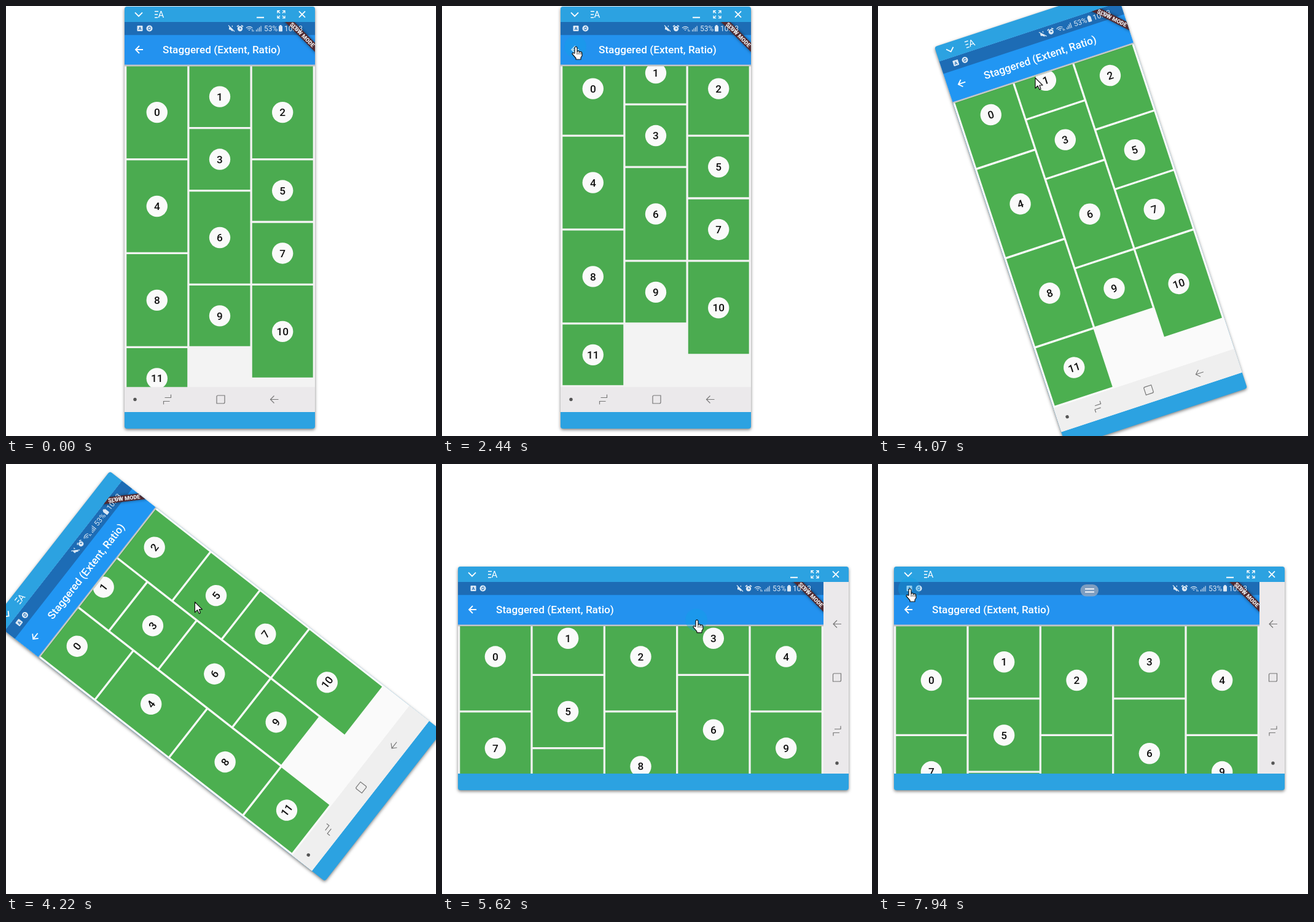
Recreate the animation shown at these times as an HTML page with a canvas. Size 700 by 700 pixels, loop 8 s.

```html
<!DOCTYPE html>
<html lang="en">
<head>
<meta charset="utf-8">
<title>Staggered grid</title>
<style>
html, body { margin: 0; width: 100%; height: 100%; overflow: hidden; background: #fff; }
canvas { display: block; width: 100vw; height: 100vh; }
</style>
</head>
<body>
<canvas id="stage" width="700" height="700"></canvas>
<script>
const c = document.getElementById('stage').getContext('2d');
const LOOP = 8000, GAP = 3.3, TOP = 69.5;
const TURN = 3990, TURNED = 4390; // the window rotates between these times
const HAND = new Path2D('M-2 2Q0-2 2 2V8Q5 6 6 9Q9 7 10 11V15L8 18V21H0V19L-6 12Q-6 9-3 11H-2Z');
const ARROW = new Path2D('M0 0V17L4 13L7 19L9 18L7 12H12Z');

// Each move: [begin, end, ...goal]; it rests in between.
const POINTER = [
  [0, 1, 580, 688], [254, 980, 366, 300], [1060, 1290, 360, 209], [1830, 2440, 217, 66],
  [2680, 3140, 420, 182], [3370, 4000, 256, 117], [4100, 4460, 409, 437],
  [5400, 5800, 418, 105], [5900, 6100, 416, 361], [6250, 6780, 449, 618],
  [6780, 7100, 435, 520], [7100, 7940, 51, 203]
];
const SCROLL = [[0, 1, 0], [1060, 1220, 38.5], [6270, 6480, 0]];

const clamp = v => Math.max(0, Math.min(1, v));
const ramp = (t, a, b) => clamp((t - a) / (b - a));
const pulse = (t, a, b) => clamp(3 * Math.sin(Math.PI * ramp(t, a, b)));

function follow(moves, t) {
  return moves.reduce((v, [a, b, ...goal]) =>
    goal.map((g, i) => v[i] + (g - v[i]) * ramp(t, a, b)), [0, 0]);
}

function box(x, y, w, h, color, r = 0) {
  c.fillStyle = color;
  c.beginPath();
  c.roundRect(x, y, w, h, r);
  c.fill();
}

function disc(x, y, r, color) {
  c.fillStyle = color;
  c.beginPath();
  c.arc(x, y, r, 0, 7);
  c.fill();
}

function line(d, color, width, x = 0, y = 0, turns = 0) {
  c.save();
  c.translate(x, y);
  c.rotate(turns * Math.PI / 2);
  c.strokeStyle = color;
  c.lineWidth = width;
  c.stroke(new Path2D(d));
  c.restore();
}

function text(s, x, y, font, color, align = 'left') {
  c.font = font + ' Roboto, sans-serif';
  c.fillStyle = color;
  c.textAlign = align;
  c.fillText(s, x, y);
}

function clipBox(x, y, w, h) {
  c.beginPath();
  c.rect(x, y, w, h);
  c.clip();
}

// Even tiles are three units tall, odd ones two; each goes to the shortest column.
function grid(width, cols, unit, scroll) {
  const w = (width - GAP * (cols + 1)) / cols;
  const ends = Array(cols).fill(0);
  for (let i = 0; i < 12; i++) {
    const col = ends.indexOf(Math.min(...ends)), span = i % 2 ? 2 : 3;
    const h = span * unit - GAP;
    const x = GAP + col * (w + GAP), y = TOP + 2.8 + ends[col] * unit - scroll;
    box(x, y, w, h, bright ? '#4caf50' : '#4bab50');
    disc(x + w / 2, y + h / 2, 17.2, '#fafafa');
    text(i, x + w / 2, y + h / 2 + 6.1, '500 17.2px', '#111', 'center');
    ends[col] += span;
  }
}

function banner(w) {
  c.save();
  clipBox(0, 0, w, 100);
  c.translate(w, 0);
  c.rotate(Math.PI / 4);
  c.shadowColor = 'rgba(0,0,0,.5)';
  c.shadowBlur = 5;
  box(-50, 24, 100, 10.4, '#512a31');
  c.shadowColor = 'transparent';
  text('SLOW MODE', 0, 32.5, '900 9.2px', '#eee', 'center');
  c.restore();
}

function statusIcons(w) {
  const ink = '#dce9f5', blue = '#1d6cb5';
  box(20.5, 6, 9, 9, ink, 1);
  text('A', 25, 13.3, 'bold 7px', blue, 'center');
  disc(40.5, 10.5, 5, ink);
  line('M-2 0Q0-4 2-1M2 0Q0 4-2 1', blue, 1.2, 40.5, 10.5);
  c.save();
  c.translate(w - 136, 10.5);
  c.fillStyle = ink;
  c.fill(new Path2D('M-4-2H-2L2-5V5L-2 2H-4Z'));
  line('M-5-5L5 5', blue, 2.5, 1, -1);
  line('M-5-5L5 5', ink, 1.2);
  disc(14, 0.5, 4.2, ink);
  line('M0-2V0H2', blue, 1.2, 14, 0.5);
  line('M-5-3L-2-5M5-3L2-5', ink, 1.6, 14, 0);
  for (let i = 0; i < 3; i++) {
    c.beginPath();
    c.arc(29, 4, 1.5 + 2.7 * i, -2.4, -0.75);
    c.strokeStyle = ink;
    c.lineWidth = 1.1;
    c.stroke();
  }
  line('M5 1V5M7 3V5', ink, 1, 29, 0);
  for (let i = 0; i < 4; i++) box(40 + 2.5 * i, 2 - 2 * i, 1.1, 3 + 2 * i, ink);
  text('53%', 53, 4.4, '12px', ink);
  box(77, -4, 6, 9, ink, 1);
  box(78.5, -5.5, 3, 2, ink);
  text('10:13', 86, 4.4, '12px', ink);
  c.restore();
}

function navIcon(kind, x, y) {
  const ink = '#777';
  if (kind == 0) disc(x, y, 2.7, '#555');
  if (kind == 1) [0, 2].forEach(q => line('M-4-3H6V-8', ink, 1.2, x, y, q));
  if (kind == 2) {
    c.strokeStyle = ink;
    c.lineWidth = 1.2;
    c.beginPath();
    c.roundRect(x - 6.5, y - 6.5, 13, 13, [2, 0, 2, 0]);
    c.stroke();
  }
  if (kind == 3) line('M7 0H-6M0-6L-6 0L0 6', ink, 1.2, x, y);
}

// The edge of a huge circle shows when scrolling past the end.
function glow(w, h, land, force) {
  const r = 1000, depth = 32 * force;
  disc(w / 2, land ? TOP + depth - r : h - depth + r, r, `rgba(33,150,243,${0.075 * force})`);
}

function app(land, scroll, force) {
  const w = land ? 595 : 310, h = land ? 312 : 594.3;
  c.save();
  clipBox(0, 0, land ? 636 : 310, land ? 312 : 635);
  box(0, 0, 636, 636, bright ? '#fafafa' : '#f3f3f3');

  c.save();
  clipBox(0, TOP + 2.5, w, h - TOP);
  grid(w, land ? 5 : 3, land ? 59.6 : 50.97, scroll);
  if (force) glow(w, h, land, force);
  c.restore();

  const shade = c.createLinearGradient(0, TOP, 0, TOP + 4);
  shade.addColorStop(0, 'rgba(0,0,0,.3)');
  shade.addColorStop(1, 'rgba(0,0,0,0)');
  box(0, TOP, w, 4, shade);
  box(0, 0, w, TOP, bright ? '#2196f3' : '#2392ef');
  box(0, 0, w, 21.2, '#1d6cb5');
  line('M6 0H-6M0-6L-6 0L0 6', '#fff', 1.8, 24, 45);
  text('Staggered (Extent, Ratio)', 62, 51, '500 17.2px', '#fff');
  banner(w);
  statusIcons(w);

  const bar = bright ? '#efefef' : '#ebe9eb';
  if (land) box(595, 0, 41, 312, bar);
  else box(0, h, 310, 41, bar);
  for (let i = 0; i < 4; i++) {
    const d = i ? 87 * i - 17.5 : 17;
    if (land) navIcon(i, 617, 312 - d);
    else navIcon(i, d, 614.5);
  }
  c.restore();
}

function frame(x, y, w, h, buttons) {
  c.save();
  c.shadowColor = 'rgba(0,0,0,.5)';
  c.shadowBlur = 5;
  c.shadowOffsetY = 2;
  box(x, y, w, h, '#2ca2e1', 4);
  c.restore();
  const m = y + 12.7, r = x + w;
  line('M-6-3L0 3L6-3', '#fff', 1.8, x + 23, m);
  line('M-7-5H-1M-7 0H-2M-7 5H-2', '#fff', 1.4, x + 56, m);
  text('A', x + 59.5, m + 5.5, '15px', '#fff', 'center');
  if (!buttons) return;
  line('M-6 5H6', '#fff', 2, r - 89, m);
  for (let q = 0; q < 4; q++) {
    line('M2 2L6 6M6 2V6H2', '#fff', 1.3, r - 55, m, q);
    line('M0 0L5 5', '#fff', 1.8, r - 21, m, q);
  }
}

function portrait(t, scroll, force) {
  const turn = ramp(t, TURN, TURNED);
  c.save();
  c.translate(347, 349);
  c.rotate(-turn * Math.PI / 2);
  c.translate(-347, -349);
  frame(193, 1, 310, 687, !turn);
  c.translate(193, 26);
  app(false, scroll, force);
  c.restore();
}

function landscape(t, scroll, force) {
  const mix = ramp(t, 4690, 4960);
  frame(26, 167, 636, 364, true);
  c.save();
  c.translate(26, 504);
  c.scale(636 / 635, 312 / 310);
  c.rotate(-Math.PI / 2);
  if (mix < 1) app(false, scroll, force);
  c.restore();
  c.save();
  c.globalAlpha = mix;
  c.translate(26, 192);
  if (mix) app(true, scroll, force);
  c.restore();
  if (t > 6950) {
    box(329.5, 196, 29.5, 19.5, 'rgba(150,170,195,.8)', 9.7);
    [202.5, 207.5].forEach(y => box(337, y, 15, 1.8, '#fff'));
  }
}

function pointer(t) {
  if (t < 254) return;
  const [x, y] = follow(POINTER, t);
  const hand = t < TURNED
    ? !bright && x > 193 && x < 503 && y > 26 && y < 661
    : x > 26 && x < 662 && y > 192 && y < 504;
  if (hand) disc(x, y, 18, 'rgba(15,160,230,.36)');
  c.save();
  c.translate(hand ? x + 1 : x, y);
  const shape = hand ? HAND : ARROW;
  c.fillStyle = '#fff';
  c.fill(shape);
  c.strokeStyle = '#111';
  c.lineWidth = 1.2;
  c.lineJoin = 'round';
  c.stroke(shape);
  if (hand) line('M2 8V13M5 9V13M8 10V13', '#111', 0.9);
  c.restore();
}

let bright = false; // colours are lighter while the window turns
const start = performance.now();

function draw() {
  const t = (performance.now() - start) % LOOP;
  bright = t > 3370 && t < TURNED;
  c.fillStyle = '#fff';
  c.fillRect(0, 0, 700, 700);
  const [scroll] = follow(SCROLL, t);
  const force = pulse(t, 1180, 1600) + pulse(t, 6440, 7000);
  (t < TURNED ? portrait : landscape)(t, scroll, force);
  pointer(t);
  requestAnimationFrame(draw);
}
draw();
</script>
</body>
</html>
```
